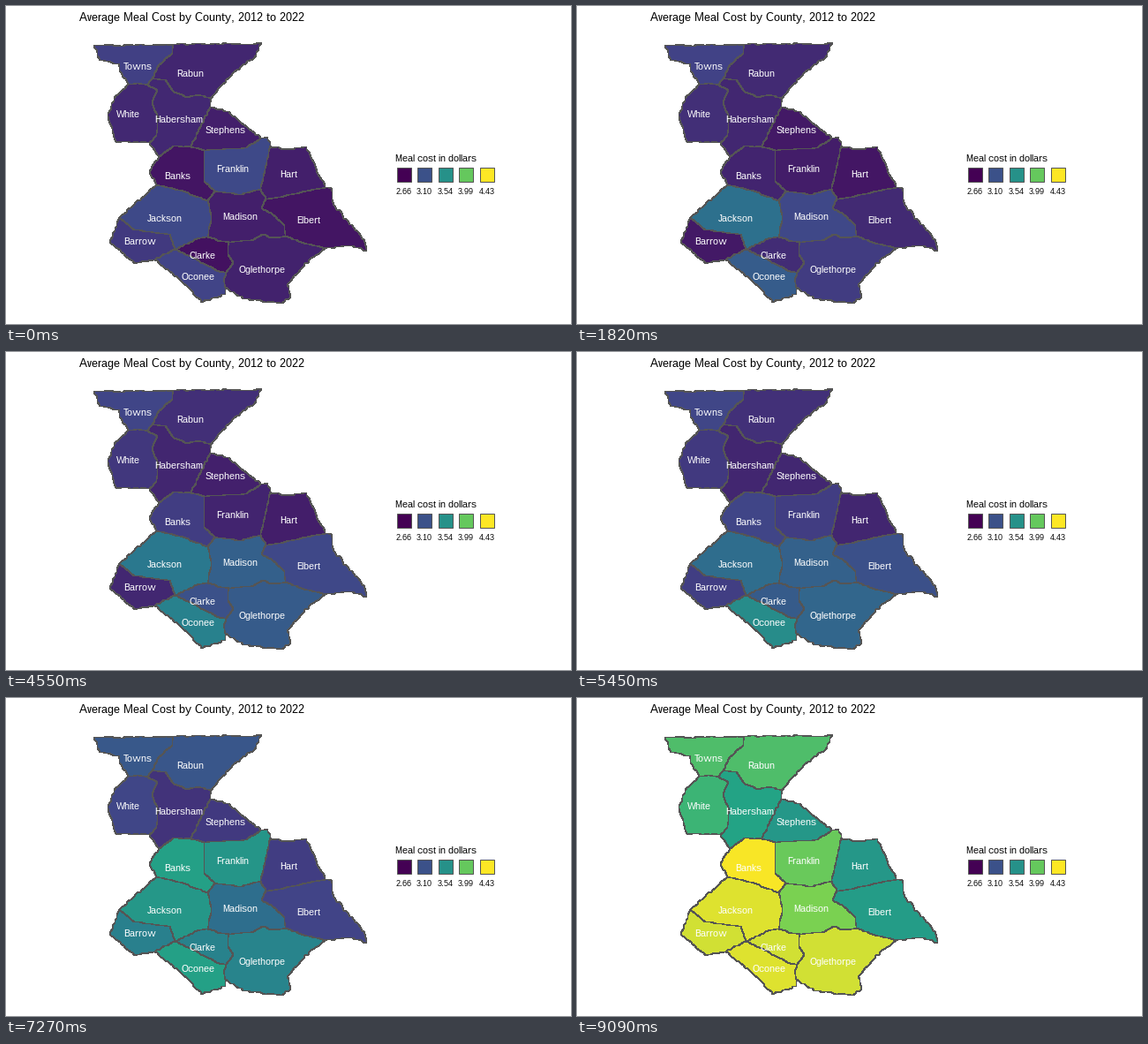
These frames come from a looping animation (640x360 px, 10 s). A matplotlib script:

```python
import numpy as np
import matplotlib.pyplot as plt
from matplotlib.animation import FuncAnimation
from matplotlib.colors import LinearSegmentedColormap
from matplotlib.patches import Polygon, Rectangle

W, H, DPI = 640, 360, 100
LOOP_MS, FRAMES, YEARS = 10000, 200, 11
PX = 72 / DPI
EDGE = "#555555"

plt.rcParams.update({"font.family": "Liberation Sans",
                     "text.hinting": "default", "text.hinting_factor": 1})
ramp = LinearSegmentedColormap.from_list(
    "cost", plt.get_cmap("viridis")(np.linspace(0, 1, 6)))
rng = np.random.default_rng(5)

# points where borders meet
NODES = {
    "A": (189, 43), "B": (165, 82), "C": (160, 89), "D": (138, 88),
    "E": (232, 104), "F": (162, 154), "G": (173, 170), "H": (209, 159),
    "I": (224, 163), "J": (231, 114), "K": (288, 149), "L": (299, 158),
    "M": (288, 207), "N": (236, 209), "P": (361, 205), "Q": (294, 218),
    "R": (316, 260), "S": (361, 274), "T": (248, 318), "U": (252, 267),
    "V": (249, 301), "W": (168, 287), "X": (191, 275), "Y": (228, 261),
    "Z": (128, 239), "a": (170, 202), "b": (228, 220),
}
borders = []


def border(owners, ends, *via):
    """Pixel-stepped line between two nodes; a coast (one owner) is rougher."""
    owners = owners.split()
    amount = 1.0 if len(owners) == 1 else 0.4
    keys = np.array([NODES[ends[0]], *via, NODES[ends[1]]], float)
    line = [keys[0]]
    for p, q in zip(keys[:-1], keys[1:]):
        n = max(1, int(np.hypot(*(q - p)) // 3))
        for k in range(1, n):
            line.append(p + (q - p) * k / n + rng.uniform(-amount, amount, 2))
        line.append(q)
    borders.append((owners, np.round(line) + 0.5))


def outline(name):
    """Join all the borders of a county into one ring."""
    rest = [line for owners, line in borders if name in owners]
    ring = rest.pop(0)
    while rest:
        for i, line in enumerate(rest):
            if np.allclose(line[0], ring[-1]):
                break
            if np.allclose(line[-1], ring[-1]):
                line = line[::-1]
                break
        rest.pop(i)
        ring = np.vstack([ring, line[1:]])
    return ring


# coast
border("Towns", "DA", (130, 75), (127, 65), (106, 61), (99, 44))
border("Rabun", "AE", (289, 42), (281, 58), (268, 66), (243, 90))
border("Habersham", "EJ")
border("Stephens", "JK", (252, 119), (266, 132))
border("Franklin", "KL", (296, 148))
border("Hart", "LP", (318, 162), (340, 159), (351, 184))
border("Elbert", "PS", (368, 206), (371, 225), (405, 264), (408, 277), (392, 271))
border("Oglethorpe", "ST", (343, 287), (318, 315), (322, 329), (312, 336), (268, 331))
border("Oconee", "TW", (248, 326), (221, 335), (195, 308))
border("Barrow", "WZ", (145, 291), (117, 266))
border("Jackson", "Za")
border("Banks", "aG", (162, 187))
border("Habersham", "GF")
border("White", "FD", (124, 153), (115, 123), (122, 104))

# shared borders
border("Towns Rabun", "AB", (188, 53), (173, 66))
border("Towns Habersham", "BC")
border("Towns White", "CD", (147, 87))
border("Rabun Habersham", "BE", (180, 83), (190, 97), (205, 103), (217, 100))
border("White Habersham", "CF", (171, 95), (165, 109), (172, 127), (170, 146))
border("Habersham Stephens", "JH", (221, 133))
border("Habersham Banks", "HG", (189, 158))
border("Banks Stephens", "HI")
border("Stephens Franklin", "IK", (272, 160))
border("Banks Franklin", "IN", (224, 198))
border("Franklin Hart", "LM", (293, 183))
border("Franklin Madison", "NM", (264, 213))
border("Hart Madison", "MQ")
border("Hart Elbert", "QP", (311, 216), (335, 210))
border("Madison Elbert", "QR", (289, 228), (302, 236), (315, 248))
border("Elbert Oglethorpe", "RS", (340, 269))
border("Madison Oglethorpe", "RU", (300, 262), (290, 258), (280, 264))
border("Clarke Oglethorpe", "UV", (251, 281), (257, 290))
border("Oconee Oglethorpe", "VT", (246, 309))
border("Clarke Oconee", "VX", (238, 299), (215, 286))
border("Madison Clarke", "UY", (239, 265))
border("Jackson Clarke", "YX", (216, 263))
border("Barrow Oconee", "WX", (176, 282))
border("Jackson Barrow", "XZ", (185, 258), (145, 253))
border("Jackson Madison", "bY", (232, 240))
border("Banks Jackson", "ab", (200, 209))
border("Banks Madison", "bN")

LABELS = {
    "Towns": (149, 69), "Rabun": (208.5, 77), "White": (138.5, 123),
    "Habersham": (196, 128), "Stephens": (249, 140), "Banks": (194, 192),
    "Franklin": (256.5, 184), "Hart": (320, 190), "Jackson": (180, 240),
    "Madison": (265, 239), "Elbert": (342.5, 242), "Barrow": (151.5, 267),
    "Clarke": (222, 282), "Oconee": (218, 307), "Oglethorpe": (290.5, 299),
}

# cost on the 0..1 scale in 2012, 2019, 2020 and 2022
TREND = {
    "Towns": (.19, .21, .28, .70), "Rabun": (.11, .15, .27, .70),
    "White": (.12, .18, .21, .66), "Habersham": (.12, .11, .15, .58),
    "Stephens": (.09, .14, .17, .53), "Banks": (.06, .23, .57, .99),
    "Franklin": (.22, .27, .52, .76), "Hart": (.09, .14, .18, .53),
    "Jackson": (.22, .30, .53, .95), "Madison": (.09, .31, .36, .80),
    "Elbert": (.06, .28, .20, .55), "Barrow": (.17, .27, .43, .93),
    "Clarke": (.05, .33, .44, .93), "Oconee": (.20, .53, .57, .95),
    "Oglethorpe": (.10, .37, .45, .93),
}
# rise or dip between 2012 and 2019
SWING = {"Franklin": -.19, "Barrow": -.16, "Jackson": .16, "Madison": .08,
         "Hart": -.05, "Stephens": -.04}


def cost(name, year):
    start, mid, late, end = TREND[name]
    surge = .57 if end > .85 else .28  # share of the last rise seen by 2021
    t = np.interp(year, [0, 7, 8, 9, 10],
                  [start, mid, late, late + surge * (end - late), end])
    return t + SWING.get(name, 0) * np.sin(np.pi * min(year, 7) / 7)


fig = plt.figure(figsize=(W / DPI, H / DPI), dpi=DPI, facecolor="white")
ax = fig.add_axes([0, 0, 1, 1])
ax.set(xlim=(0, W), ylim=(H, 0))
ax.axis("off")


def text(x, y, s, size, color="black", ha="left"):
    ax.text(x, y, s, size=size * PX, color=color, ha=ha, va="baseline", zorder=5)


text(83, 17, "Average Meal Cost by County, 2012 to 2022", 13)
text(441, 176, "Meal cost in dollars", 11)
for i, t in enumerate(np.linspace(0, 1, 5)):
    x = 442.5 + 23.5 * i
    ax.add_patch(Rectangle((x, 182.5), 16, 16, fc=ramp(t), ec=EDGE, lw=PX))
    text(x + 8, 213, f"{2.66 + 1.77 * t:.2f}", 9, ha="center")

shapes = {}
for name, (x, y) in LABELS.items():
    shapes[name] = ax.add_patch(Polygon(outline(name), closed=True, ec=EDGE,
                                        lw=PX, antialiased=False))
    text(x, y + 3.5, name, 11, "white", "center")


def draw(i):
    year = int((i + 0.9) * YEARS / FRAMES)
    for name, shape in shapes.items():
        shape.set_facecolor(ramp(cost(name, year)))
    return list(shapes.values())


anim = FuncAnimation(fig, draw, frames=FRAMES, interval=LOOP_MS / FRAMES,
                     repeat=True, repeat_delay=0, blit=False)
plt.show()
```
